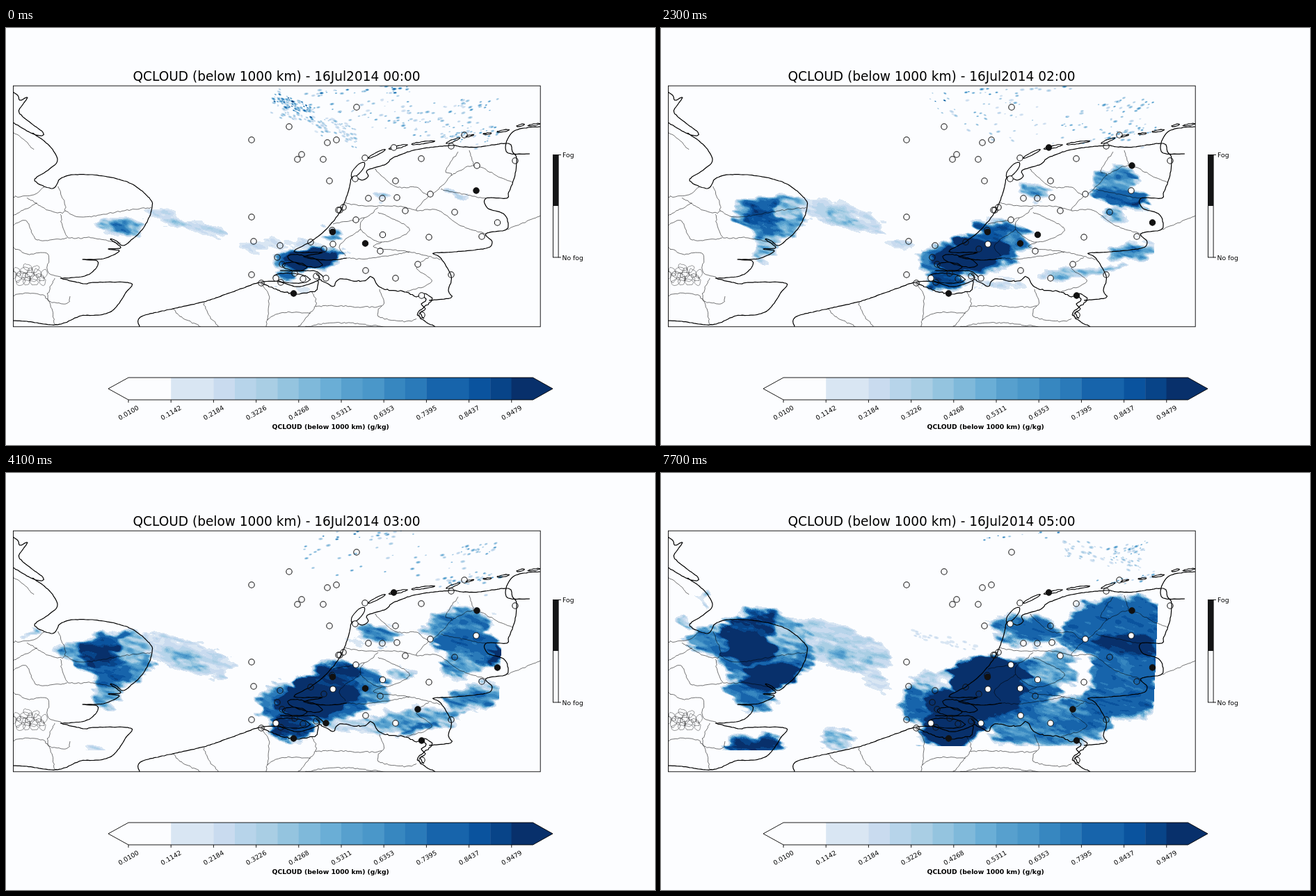
Animation, 933 px wide and 600 px high, one loop 8000 ms. Source, as an HTML page with a canvas:

```html
<!DOCTYPE html>
<html lang="en">
<head>
<meta charset="utf-8">
<title>Cloud water forecast</title>
<style>
  html, body { margin: 0; width: 100%; height: 100%; overflow: hidden; background: #fcfdff; }
  canvas { position: absolute; left: 10px; top: 83px; display: none; }
  svg { position: absolute; left: 0; top: 0; }
  text { font-family: "DejaVu Sans", sans-serif; font-size: 9.25px; }
</style>
</head>
<body>
<svg id="map" width="933" height="600" viewBox="0 0 933 600"></svg>
<script>
const X0 = 10, Y0 = 83, W = 758, H = 347, HOURS = 6;
const PAPER = '#fcfdff', RAD = Math.PI / 180;
const svg = document.getElementById('map');
const blues = ['#d9e6f3', '#d9e6f3', '#c9dbef', '#b7d4ea', '#a9cee4', '#94c4df', '#7fb9da', '#6aaed6', '#57a0ce',
  '#4a97c9', '#3787c0', '#2a7ab9', '#1764ab', '#1764ab', '#0a539e', '#084488', '#08306b'];
const rgb = blues.map(c => [1, 3, 5].map(i => parseInt(c.slice(i, i + 2), 16)));

let seed = 7;
function rand() {
  seed = (seed + 0x6D2B79F5) | 0;
  let t = Math.imul(seed ^ (seed >>> 15), 1 | seed);
  t = (t + Math.imul(t ^ (t >>> 7), 61 | t)) ^ t;
  return ((t ^ (t >>> 14)) >>> 0) / 4294967296;
}
const numbers = s => s.split(/[ ,;]+/).map(Number);
const points = s => s.split(' ').map(p => p.split(',').map(Number));

function add(tag, attrs, text) {
  const el = document.createElementNS('http://www.w3.org/2000/svg', tag);
  for (const k in attrs) el.setAttribute(k, attrs[k]);
  if (text) el.textContent = text;
  return svg.appendChild(el);
}

// ---- noise that bends cloud edges and streaks their tone ----
function hash(x, y) {
  const s = Math.sin(x * 127.1 + y * 311.7) * 43758.5453;
  return s - Math.floor(s);
}
function noise(x, y) {
  const i = Math.floor(x), j = Math.floor(y);
  let u = x - i, v = y - j;
  u *= u * (3 - 2 * u);
  v *= v * (3 - 2 * v);
  const a = hash(i, j), b = hash(i, j + 1);
  const top = a + (hash(i + 1, j) - a) * u, low = b + (hash(i + 1, j + 1) - b) * u;
  return top + (low - top) * v - 0.5;
}
const bendX = new Float32Array(W * H), bendY = new Float32Array(W * H), tone = new Float32Array(W * H);
for (let y = 0, k = 0; y < H; y++) {
  for (let x = 0; x < W; x++, k++) {
    const u = x * 0.96 + y * 0.27, v = y * 0.96 - x * 0.27;
    bendX[k] = 20 * noise(u / 24, v / 10) + 12 * noise(u / 10, v / 4);
    bendY[k] = 11 * noise(u / 20 + 50, v / 11 + 90) + 5 * noise(u / 8, v / 5 + 70);
    tone[k] = noise(u / 22 + 9, v / 6) + 0.6 * noise(u / 8, v / 3 + 40);
  }
}

// Each cloud: first hour; x y rx ry level tilt; hourly change of x y rx ry level
const sea = [
  '0; 255 281 62 7 2.5 16; 0 -6.5 3 4.6 .1',
  '0; 248 279 14 4 7 15; 3 -3.5 6 2.4 -.4',
  '3; 300 286 14 9 2 40; 4 6 4 2 0',
  '0; 395 313 62 8 2 -4; -25 -1 -21 -.5 0',
  '0; 425 376 15 4 2 2; 25 -4 16 1 .6'
];
const england = [
  '0; 165 286 30 13 8 8; -4 -6 8 8 .7',
  '0; 165 288 14 9 13 10; -8 -9 6 4 1.2',
  '1; 160 315 9 16 5 15; -7 1 6 1 1.8',
  '2; 152 293 22 8 13 -12; 1 -.3 7 3.5 1.7',
  '2; 165 250 32 6 13 -5; -8 -11 3 4 1',
  '1; 183 268 24 9 5 -20; -1 -8 .5 5 .5',
  '3; 90 258 20 8 8 12; -10 -7.5 6 5 1.5',
  '3; 32 231 5 6 6 0; 0 -7 1 1 0',
  '4; 52 186 12 6 4 -10; 13 -8 -6 3 1',
  '3; 126 396 15 3 4 0; 5 -2 13 5 6',
  '4; 249 394 17 5 8 -8; 4 -8 7 7 -1'
];
const delta = [
  '2; 600 352 62 6 6 -6; -12 3 9 9 1.6',
  '3; 590 370 26 6 13 -15; 7 -4 2 4 0',
  '0; 432 333 46 15 12 -6; 3 -2 11 6 .2',
  '1; 490 303 24 12 11 10; 5 -1 10 5.5 .4',
  '3; 530 318 20 14 9 0; 15 -15 8 4 0',
  '0; 438 333 37 12 20 -14; 3 -4 7 6 0',
  '0; 470 295 9 5 11 10; 1 -1 8 4 1.7',
  '0; 402 357 13 9 13 -8; 3 2 6 4.6 1',
  '3; 405 303 8 4 4 0; -6 -2 10 5 -.5'
];
const east = [
  '0; 639 236 16 3 5 16; 12 5 11 5 6',
  '1; 650 217 22 6 8 -6; 1 1 14.5 9 1.3',
  '2; 658 240 40 12 13 10; 5 7 4 16 0',
  '1; 685 321 25 8 6 -4; -5 1 9 4.5 1.8',
  '2; 650 270 14 10 8 0; 0 8 5 8 1.5',
  '3; 668 237 30 5 14 6; 1 5 7 7 1.5',
  '0; 544 243 9 3 6 10; -4 -3.6 8 3.4 1.3',
  '3; 567 290 16 8 7 -15; 2 -9 4 5 1'
];
const clouds = [...sea, ...england, ...delta, ...east].map(numbers);

// Speck bands: count and its hourly change; x1 y1 x2 y2; spread level tilt
const bands = [
  '105 -45; 384 108 510 160; 14 7 22',
  '70 -32; 388 96 440 122; 10 17 25',
  '120 -25; 430 108 700 152; 26 9 -10',
  '32 -3; 625 158 716 146; 6 11 -15',
  '22 1; 640 114 705 108; 9 10 -20',
  '26 -3; 440 92 590 87; 5 13 -5',
  '-160 45; 570 105 690 130; 12 6 22',
  '-80 22; 360 232 450 250; 6 3 15'
].map(numbers);

function drawSpecks(ctx, hour, [count, change, x1, y1, x2, y2, spread, level, tilt]) {
  for (let n = count + change * hour; n > 0; n--) {
    const k = rand();
    const x = x1 + (x2 - x1) * k + (rand() - 0.5) * 8;
    const y = y1 + (y2 - y1) * k + (rand() + rand() - 1) * spread * 1.4;
    const r = 1.2 + rand() * 2.6, top = level * (0.25 + 0.75 * rand());
    for (let j = 1; j <= 3; j++) {
      ctx.fillStyle = blues[Math.min(16, Math.floor(top * j / 3))];
      ctx.beginPath();
      ctx.ellipse(x, y, r * (1.25 - j * 0.25), r * (0.62 - j * 0.12), tilt * RAD, 0, 7);
      ctx.fill();
    }
  }
}

function newContext() {
  const c = document.createElement('canvas');
  c.width = W;
  c.height = H;
  return c.getContext('2d', { willReadFrequently: true });
}

function drawHour(hour) {
  const soft = newContext();
  soft.fillRect(0, 0, W, H);
  soft.translate(-X0, -Y0);
  soft.filter = 'blur(2.5px)';
  for (const [first, x, y, rx, ry, level, tilt, dx, dy, drx, dry, dLevel] of clouds) {
    const age = hour - first;
    if (age < 0 || rx + drx * age <= 0) continue;
    const g = 12 * Math.min(20, level + dLevel * age);
    soft.fillStyle = `rgb(${g},${g},${g})`;
    soft.beginPath();
    soft.ellipse(x + dx * age, y + dy * age, rx + drx * age, ry + dry * age, tilt * RAD, 0, 7);
    soft.fill();
  }
  const src = soft.getImageData(0, 0, W, H).data;
  const ctx = newContext(), img = ctx.createImageData(W, H);
  for (let y = 0, k = 0; y < H; y++) {
    const eastEnd = 714 - (y + Y0 - 190) / 24 - X0;
    for (let x = 0; x < W; x++, k++) {
      if (x > eastEnd || y > (x < 320 ? 315 : 309)) continue;
      const sx = Math.max(0, Math.min(W - 1, Math.round(x + bendX[k])));
      const sy = Math.max(0, Math.min(H - 1, Math.round(y + bendY[k])));
      const g = src[(sy * W + sx) * 4] / 12;
      const v = g + tone[k] * Math.max(3, Math.min(g * 1.3, 16 - g));
      if (g < 0.3 || v < 0.8) continue;
      img.data.set([...rgb[Math.min(16, Math.floor(v))], 255], k * 4);
    }
  }
  ctx.putImageData(img, 0, 0);
  ctx.translate(-X0, -Y0);
  bands.forEach(b => drawSpecks(ctx, hour, b));
  document.body.insertBefore(ctx.canvas, svg);
  return ctx.canvas;
}
const layers = Array.from({ length: HOURS }, (_, h) => drawHour(h));

// ---- map lines: splines through key points with a crinkled edge ----
function crinkle(pts, jitter) {
  const out = [pts[0]], at = i => pts[Math.max(0, Math.min(pts.length - 1, i))];
  for (let i = 0; i < pts.length - 1; i++) {
    const p = [at(i - 1), at(i), at(i + 1), at(i + 2)];
    const n = Math.max(2, Math.round(Math.hypot(p[2][0] - p[1][0], p[2][1] - p[1][1]) / 3));
    for (let j = 1; j <= n; j++) {
      const t = j / n;
      out.push([0, 1].map(c => {
        const [a, b, d, e] = p.map(q => q[c]);
        const s = b + 0.5 * t * (d - a + t * (2 * a - 5 * b + 4 * d - e + t * (3 * (b - d) + e - a)));
        return s + (j < n ? (rand() - 0.5) * jitter : 0);
      }));
    }
  }
  return out;
}
function lines(list, width, jitter) {
  const d = list.map(s => 'M' + crinkle(points(s), jitter).map(p => p.map(n => n.toFixed(1)).join(' ')).join('L')).join('');
  add('path', { d, fill: 'none', stroke: '#000', 'stroke-width': width, 'stroke-linejoin': 'round', 'clip-path': 'url(#frame)' });
}
// A closed outline: centre, radii, tilt
function ring(x, y, rx, ry, tilt, sides = 8) {
  const c = Math.cos(tilt * RAD), s = Math.sin(tilt * RAD);
  return Array.from({ length: sides + 1 }, (_, i) => {
    const a = i % sides * 2 * Math.PI / sides, u = rx * Math.cos(a), v = ry * Math.sin(a);
    return `${x + u * c - v * s},${y + u * s + v * c}`;
  }).join(' ');
}
const rings = list => list.map(s => ring(...numbers(s)));

const clip = add('clipPath', { id: 'frame' });
clip.appendChild(add('rect', { x: X0, y: Y0, width: W, height: H }));

const englishCoast = [
  '10,92 17,97 20,104 31,100 22,113 19,122 36,137 53,150 52,155 38,152 20,142 10,136',
  '38,151 62,169 74,190 60,205 41,219 67,231 78,217 98,211 140,213 180,224 207,246 210,258 206,272 196,290 178,307 168,313 158,306 150,304 165,316 147,318 163,321 140,332 110,333 131,335 130,345 113,357 78,360',
  '78,360 113,368 125,366 179,367 172,381 155,405 135,413 108,414 85,424 65,427 30,422 10,421'
];
const mainCoast = [
  '192,430 193,416 235,405 284,394 325,380 365,366 392,365 420,372 450,362 446,354',
  '438,308 460,290 478,268 487,250 493,232 498,214 512,219 521,213 519,205 546,196 556,187 590,175 640,169 655,171 680,171 722,166 728,178 734,188 731,215 722,238 720,245 690,245 692,259 715,267 721,278 719,290 690,296 699,308 690,317 645,322 614,324 624,330 640,357 636,378 640,388 608,392',
  '753,181 722,180 719,166 728,150 745,144 768,142',
  '438,308 414,322 455,323 428,329 462,334 490,331',
  '394,349 418,350 445,350 460,362'
];
const southBorder = [
  '367,367 385,375 413,382 445,378 450,362 470,372 478,362 512,364 525,358 540,374 575,380 590,387 602,382 612,392 592,410 600,420 617,430',
  '597,385 604,390 597,397 603,404 595,410 601,418'
];
const islands = rings(['506 204 14 5 -48', '533 181 14 2 -27', '564 171 14 1.6 -12', '600 165 17 1.6 -8', '643 162 11 1.6 -22',
  '667 155 6 1 -12', '692 152 6 1.2 -6', '715 148 9 1.2 -9', '740 140 6 1.2 -15', '759 139 9 1.2 -10',
  '411 360 27 7 4', '415 343 18 6 4', '430 335 26 7 14']);
lines(englishCoast, 1.2, 0.7);
lines(mainCoast, 1.2, 0.7);
lines(southBorder, 1.2, 2);
lines(islands, 1.1, 1);

const counties = [
  '10,149 25,160 40,175', '10,243 40,240 55,229', '30,244 60,262 85,263 75,228', '85,263 110,272 170,263 209,258',
  '78,268 88,300 125,302 165,310', '10,284 30,278 45,305 88,302', '10,315 30,325 60,325 60,350 80,360',
  '10,270 25,262 45,252', '70,360 60,390 88,396 92,386', '10,385 35,382 60,390 70,426'
];
const belgium = [
  '284,394 290,410 305,430', '240,403 250,415 280,430', '365,367 378,385 374,430', '440,380 445,400 420,430',
  '445,400 480,400 540,400 537,376', '430,430 480,424 545,430', '540,400 535,415 575,422 590,418', '376,420 395,410 438,410'
];
const provinces = [
  '530,203 560,228 590,229 610,240 640,212 632,205 650,178', '640,212 673,198 710,215 728,222', '673,198 666,176',
  '625,232 670,242 690,245', '610,240 590,262 620,262 655,285 690,296', '487,252 515,256 560,256 590,262',
  '535,258 515,273 470,282', '515,273 510,290 540,308 580,290 535,265', '540,308 530,316 580,322 625,333',
  '490,331 520,332 580,322', '510,290 480,312 488,328', '608,330 590,345 612,365 575,380', '719,290 735,284 768,270'
];
lines(counties, 0.55, 2.2);
lines(belgium, 0.55, 2.2);
lines(provinces, 0.55, 1.6);
lines(Array.from({ length: 18 }, (_, i) => {
  const r = Math.sqrt(i / 18);
  return ring(34 + 25 * r * Math.cos(i * 2.4), 356 + 13 * r * Math.sin(i * 2.4), 7, 4.5, i * 50, 5);
}), 0.4, 2);
add('rect', { x: 10.5, y: 83.2, width: 757.7, height: 346.6, fill: 'none', stroke: '#000', 'stroke-width': 0.9 });

// ---- stations ----
function station([x, y], fill) {
  return add('circle', { cx: x, cy: y, r: 4.2, fill, stroke: '#111', 'stroke-width': 1.05 });
}
const silent = '504,114 407,142 353,161 462,165 475,161 425,182 419,189 456,189 465,220 353,272 356,307 394,313 390,330 397,340 353,355 367,367 395,366 415,353 427,361 446,357 438,308 457,318 469,291 478,262 480,262 485,258 516,187 597,188 640,170 659,154 732,191 560,220 541,245 645,265 684,300 538,321 640,355 598,413';
const clear = '470,311 610,239 517,349 560,360 388,360 503,276 574,263 502,217 521,245 562,244';
points(silent).forEach(p => station(p, 'none'));
points(clear).forEach(p => station(p, PAPER));
// Observed fog, one digit per hour
const reports = Object.entries({
  '676,234': '110000', '469.5,293.5': '101111', '516.5,310': '111100', '413.5,382': '111111', '677,198': '011111', '706.5,280': '011111',
  '597.5,385': '011111', '557.5,172': '001111', '541.5,297.5': '001000', '592,340': '000111', '460,360': '000100', '608,301': '000010'
}).map(([at, fog]) => ({ dot: station(at.split(','), PAPER), fog }));

// ---- title, legend and colour bar ----
const title = add('text', { x: 389, y: 76.4, 'text-anchor': 'middle', style: 'font-size:18.52px' }, ' ');
const edge = { stroke: '#000', 'stroke-width': 0.9 };
add('rect', { x: 786.5, y: 182.5, width: 7.6, height: 147.5, fill: PAPER, ...edge });
add('rect', { x: 786.5, y: 182.5, width: 7.6, height: 73.5, fill: '#141516' });
add('path', { d: 'M794 182.5h4M794 330h4', ...edge });
add('text', { x: 800, y: 186 }, 'Fog');
add('text', { x: 799.5, y: 333.5 }, 'No fog');

const step = 30.6;
blues.slice(0, 16).forEach((c, i) => add('rect', { x: 237.2 + i * step, y: 503, width: step + 0.4, height: 32, fill: c }));
add('path', { d: 'M726.5 503H757.5L786 519L757.5 535H726.5Z', fill: blues[16] });
add('path', { d: 'M147 519L176 503H757.5L786 519L757.5 535H176Z', fill: 'none', ...edge });
for (let i = 0; i < 10; i++) {
  const x = 176 + i * step * 2;
  add('path', { d: `M${x} 535v4`, ...edge });
  add('text', { transform: `translate(${x} 553.5) rotate(-30)`, y: 3.3, 'text-anchor': 'middle' }, (0.01 + i * 0.104212).toFixed(4));
}
add('text', { x: 466.7, y: 577, 'text-anchor': 'middle', 'font-weight': 'bold' }, 'QCLOUD (below 1000 km) (g/kg)');

// ---- playback: hourly steps ----
let shown = -1;
function show(hour) {
  if (hour === shown) return;
  shown = hour;
  title.textContent = `QCLOUD (below 1000 km) - 16Jul2014 0${hour}:00`;
  layers.forEach((c, i) => { c.style.display = i === hour ? 'block' : 'none'; });
  reports.forEach(r => r.dot.setAttribute('fill', r.fog[hour] === '1' ? '#111' : PAPER));
}
const start = performance.now();
function tick() {
  const t = (performance.now() - start) % 8000;
  show(t < 500 ? 0 : 1 + Math.floor((t - 500) / 1800));
  requestAnimationFrame(tick);
}
tick();
</script>
</body>
</html>
```
